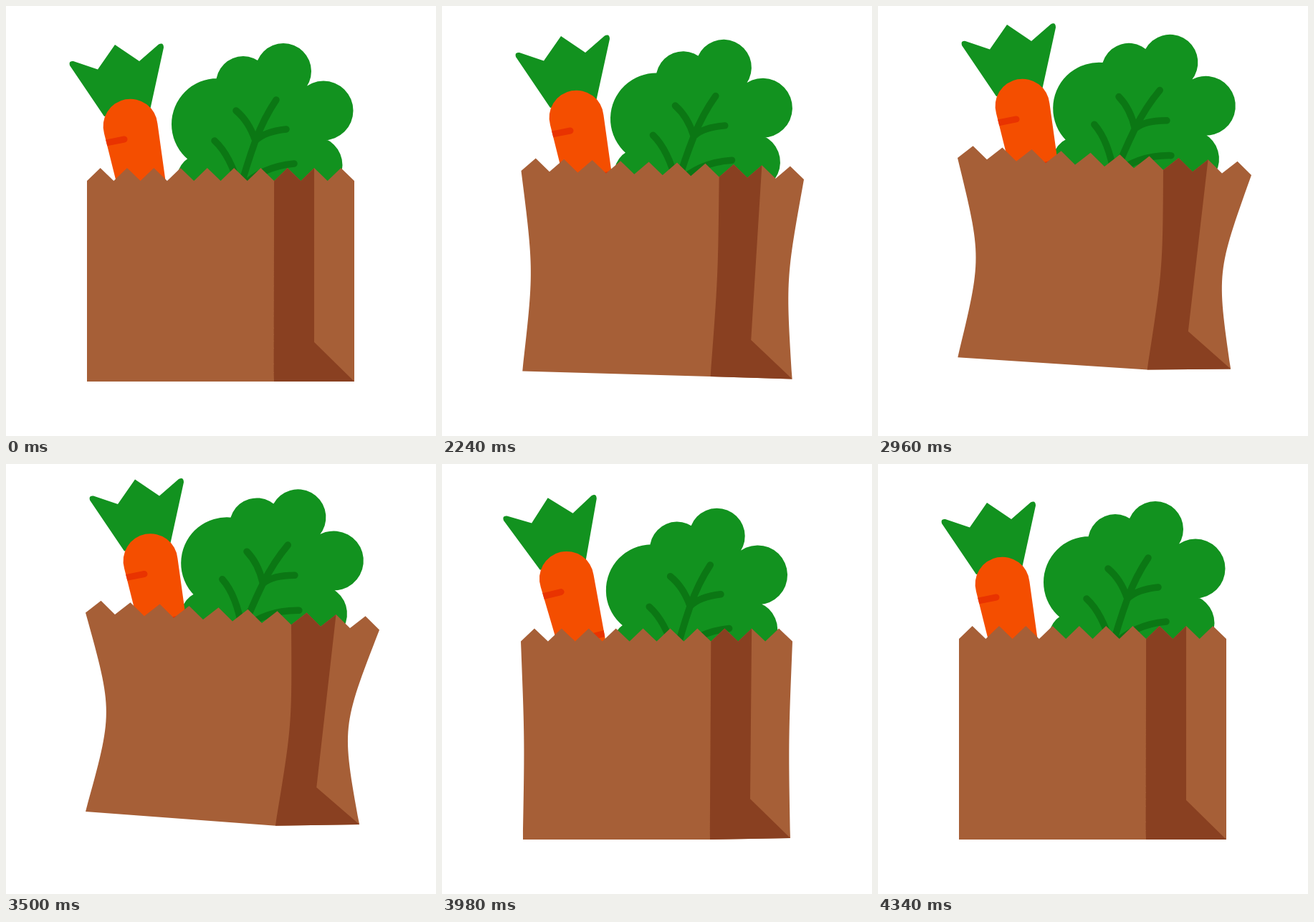
Recreate the animation shown at these times as an HTML page with a canvas. Size 600 px wide and 600 px high, loop 4370 ms.

```html
<!DOCTYPE html>
<html lang="en">
<head>
<meta charset="utf-8">
<title>Grocery bag</title>
<style>
  html, body { margin: 0; height: 100%; overflow: hidden; background: #fff; }
  canvas { display: block; width: 100vw; height: 100vh; }
</style>
</head>
<body>
<canvas id="stage" width="600" height="600"></canvas>
<script>
const ctx = document.getElementById('stage').getContext('2d');
const LOOP = 4370, START = 2030, END = 4340, STEP = 30;
const BAG = '#a65f37', FOLD = '#894021', GREEN = '#12921f', VEIN = '#0b7714',
      ORANGE = '#f44e00', STRIPE = '#e93300';

const lerp = (a, b, u) => a + (b - a) * u;
const progress = (t, from, to) => Math.min(1, Math.max(0, (t - from) / (to - from)));
const ramp = (t, from, to) => {
  const u = progress(t, from, to);
  return u * u * (3 - 2 * u);
};

// The bag leans right and hops up, drifts higher, then drops back
const lean = t => ramp(t, START, 2450) - ramp(t, 3560, 3980);
const lift = t => (24 + 8.5 * ramp(t, 2450, 3500)) * (ramp(t, START, 2450) - ramp(t, 3650, 3960));
// The contents are thrown upward and settle
const toss = t => {
  const v = progress(t, 3600, END);
  return (1 - v) * Math.sin(2 * Math.PI * v / 0.89);
};
const swing = t => Math.sin(2 * Math.PI * progress(t, 3780, 4280));

const leaves = new Path2D('M94 77L128 88.5L152 54L186 77L213 53.5Q220 50 220 58L201 145L137 154L89 83Q87 76 94 77Z');
const root = new Path2D('M137 178A38 38 0 1 1 211.4 164L229 290L165 290Z');
const stripes = new Path2D('M130 193L165 186M206 250L240 243');
const veins = new Path2D('M326 258Q335 224 348 188Q360 156 377 131M321 146Q339 161 348 188Q361 175 391 172M291 188Q313 208 326 255Q356 224 402 220');
const lobes = [[295, 165, 64], [331, 108, 38], [387, 91, 39], [443, 146, 41.5], [429.5, 222, 40], [275, 243, 37]];
const head = new Path2D('M295 165L331 108L387 91L443 146L429 300L275 300Z');
for (const [x, y, r] of lobes) {
  head.moveTo(x + r, y);
  head.arc(x, y, r, 0, 2 * Math.PI);
}

function fill(path, color) {
  ctx.fillStyle = color;
  ctx.fill(path);
}

function stroke(path, color, width) {
  ctx.strokeStyle = color;
  ctx.lineWidth = width;
  ctx.lineCap = ctx.lineJoin = 'round';
  ctx.stroke(path);
}

function posed(px, py, dx, dy, degrees, draw) {
  ctx.save();
  ctx.translate(px + dx, py + dy);
  ctx.rotate(degrees * Math.PI / 180);
  ctx.translate(-px, -py);
  draw();
  ctx.restore();
}

function drawLettuce() {
  // Two fills keep the overlapping outlines from cancelling out
  ctx.fillStyle = GREEN;
  ctx.fill(head, 'nonzero');
  stroke(veins, VEIN, 9.5);
}

function drawCarrot() {
  fill(leaves, GREEN);
  fill(root, ORANGE);
  ctx.clip(root);
  stroke(stripes, STRIPE, 9);
}

function drawBag(t, puff, drop) {
  const tip = lean(t), up = lift(t), late = lift(t - 80);
  const lx = 113 - puff + tip, ly = 244 - up - 4 * tip + drop;
  const rx = 486 + puff + 32 * tip, ry = 244 - up + 20 * tip + drop;
  const left = [113 - 0.06 * up, 524 - 1.2 * up];
  const foot = [374 + 0.06 * up, 524 - 0.59 * up];
  const right = [486 + 0.22 * up, 524 - 0.65 * late];
  const crease = [430 + 0.1 * up, 469 - 0.55 * late];
  const pinch = puff + 0.8 * up;
  const tilt = Math.atan2(ry - ly, rx - lx);

  // Corner n of the zigzag edge; odd ones are peaks
  const tooth = n => {
    const h = n % 2 * 18;
    return [lerp(lx, rx, n / 20) + h * Math.sin(tilt), lerp(ly, ry, n / 20) - h * Math.cos(tilt)];
  };
  const bowTo = (path, [x0, y0], [x1, y1], amount) => {
    const x = (x0 + x1) / 2 + amount * 4 / 3, y = (y0 + y1) / 2;
    path.bezierCurveTo(x, y, x, y, x1, y1);
  };

  const body = new Path2D();
  for (let n = 0; n <= 20; n++) body.lineTo(...tooth(n));
  bowTo(body, [rx, ry], right, -pinch);
  body.lineTo(...foot);
  body.lineTo(...left);
  bowTo(body, left, [lx, ly], pinch);
  fill(body, BAG);

  const side = new Path2D();
  for (let n = 17; n >= 14; n--) side.lineTo(...tooth(n));
  bowTo(side, tooth(14), foot, 0.28 * up);
  side.lineTo(...right);
  side.lineTo(...crease);
  fill(side, FOLD);
}

function draw(now) {
  const time = now % LOOP;
  const moving = time >= START && time < END;
  const t = moving ? START + Math.floor((time - START) / STEP) * STEP : 0;
  const tip = lean(t), up = lift(t);
  const puff = moving && t < 4180 ? 3 : 0;
  const drop = 15 * Math.max(0, -toss(t));

  ctx.fillStyle = '#fff';
  ctx.fillRect(0, 0, 600, 600);
  posed(358, 240, 6 * tip - puff / 3, 12 * tip - up - 45 * toss(t),
    6 * tip * tip - 1.5 * swing(t), drawLettuce);
  posed(190, 243, 28 * tip + drop, drop - up - 30 * toss(t - 120), -4 * swing(t), drawCarrot);
  drawBag(t, puff, drop);
}

const begin = performance.now();
function tick() {
  draw(performance.now() - begin);
  requestAnimationFrame(tick);
}
tick();
</script>
</body>
</html>
```
